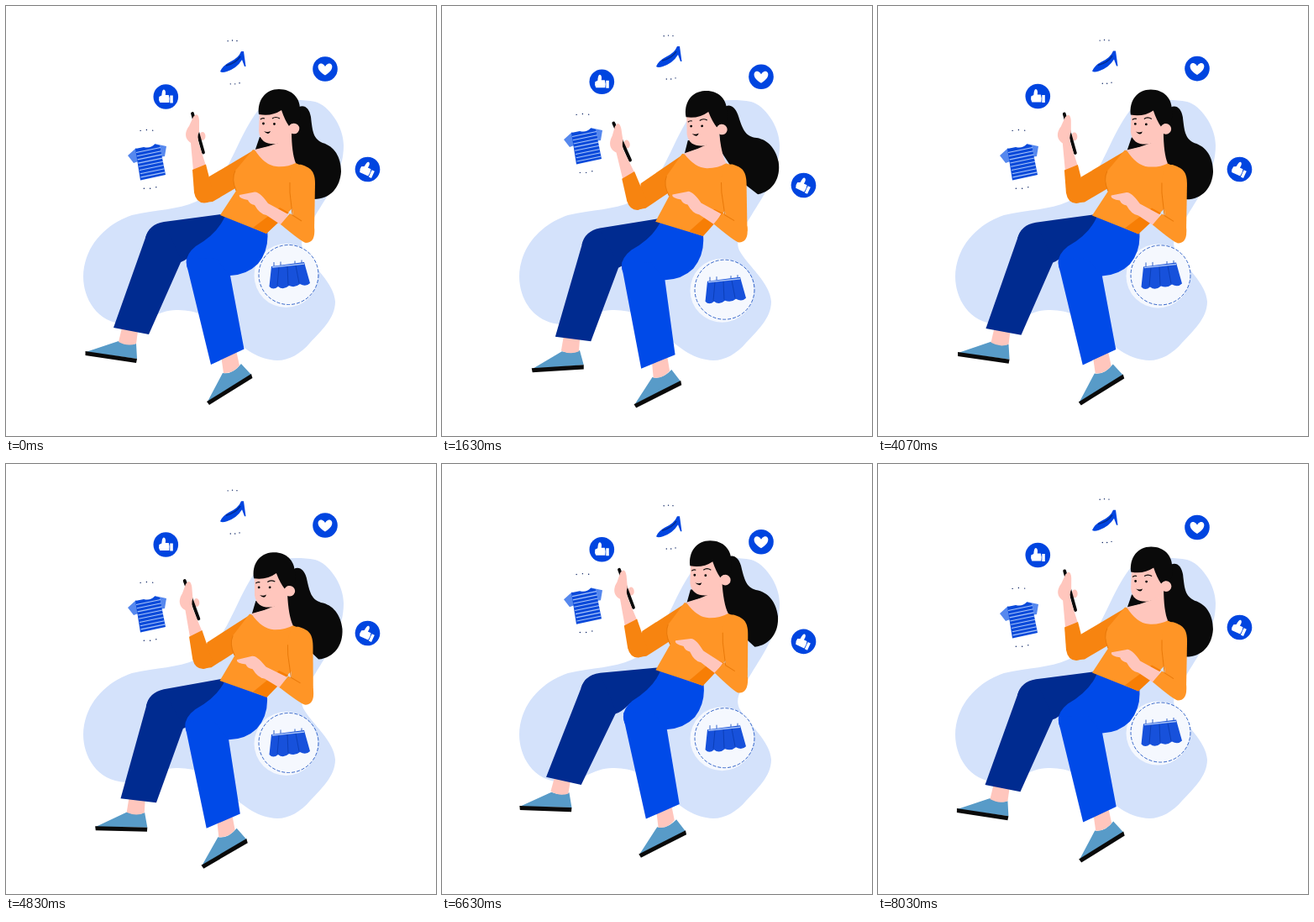
An HTML page that plays this animation: 512x512 px, repeating every 8070 ms.

```html
<!DOCTYPE html>
<html lang="en">
<head>
<meta charset="utf-8">
<title>Floating shopper</title>
<style>
html, body { margin: 0; height: 100%; overflow: hidden; background: #fff; }
svg { display: block; width: 100vw; height: 100vh; }
.skin { fill: #ffc6bd; }
.top { fill: #ff9526; }
.sleeve { fill: #f78410; }
.navy { fill: #002b90; }
.blue { fill: #004ae8; }
.badge { fill: #0045e0; }
.shoe { fill: #589bc8; }
.hair { fill: #0a0a0a; }
.white { fill: #fff; }
.line { fill: none; stroke: #e8790a; stroke-width: 1; }
</style>
</head>
<body>
<svg viewBox="0 0 512 512">
  <defs>
    <g id="like">
      <circle class="badge" r="14.8"/>
      <path class="white" d="M-8 0L-5 -1.500Q-4.500 -8.500 -2.500 -8.500Q.5 -8 -.5 -2L3.500 -2Q5 2 4 7L-7 7Q-9 4 -8 0ZM5 -1.500H8.500V7.500H5Z"/>
    </g>
  </defs>

  <path fill="#d4e2fb" d="M302 122C318 112 345 110 368 114C384 118 402 143 402 166C402 198 384 224 368 250C358 266 348 277 354 291C364 309 391 330 392 352C392 372 375 387 362 401C351 414 337 422 323 422C300 421 284 408 268 394C246 372 233 363 205 362C180 361 166 379 142 379C108 377 92 348 92 322C93 286 118 260 150 249C180 242 204 243 226 233C264 215 274 155 302 122Z"/>

  <g data-float="-7.4 7.4">
    <circle fill="#f5f8fe" cx="333.500" cy="321" r="38"/>
    <circle cx="336.500" cy="320" r="35.500" fill="none" stroke="#3465c9" stroke-width="1" stroke-dasharray="4 2"/>
    <path fill="#1751db" d="M316 310L355 305L362 330Q357 335 350 331Q344 336 337 333Q330 339 324 334Q318 339 313.500 334Z"/>
    <path fill="none" stroke="#0b3fb8" d="M325 311L323 333M335 310L336 332M345 309L349 330"/>
    <path fill="none" stroke="#a9c3f5" stroke-width="1.500" d="M317 311L355 307"/>
    <path fill="none" stroke="#3465c9" d="M319 310V305M327 309V304.500M344 307V303.500M352 306V302.500"/>
  </g>

  <g id="body">
    <g data-spin="2.5 -.9 282 260"><g data-spin="3.16 -1.5 350 122">
      <path class="hair" d="M344 124C352 115 361 119 363 132C365 150 366 158 377 163C391 167 399 180 399 197C398 216 386 230 367 230L350 210L334 170L338 140Z"/>
    </g></g>

    <g data-spin="0 -3 258 262">
      <path class="navy" d="M264 247L188 257Q170 260 166 276L208 305Q215 303 225 292L272 272Z"/>
      <g data-spin=".68 -.8 188 276">
        <g data-spin="4.86 .4 147 394">
          <path class="shoe" d="M95 412L134 399Q146 405 155 402L156 420Z"/>
          <path class="hair" d="M94.500 411L156 420L155 425L94.500 416Z"/>
        </g>
        <path class="skin" d="M138 383L134 400Q145 406 155 402L157 387Z"/>
        <path class="navy" d="M166 276Q170 262 188 258L209 303L170 391L128 383Z"/>
      </g>
    </g>

    <g data-spin="0 1.7 285 258">
      <path class="blue" d="M262 247L311 266Q314 290 300 307Q287 320 267 321Q240 342 216 312Q211 298 226 286Q254 270 262 247Z"/>
      <g data-spin="-1.25 -.6 241 310">
        <g data-spin="-1.63 -1.5 267 430">
          <path class="shoe" d="M240 471L258 437Q270 439 280 426L292 439Z"/>
          <path class="hair" d="M239 471L292 438L293.500 443L242 475Z"/>
        </g>
        <path class="skin" d="M256 416L259 437Q270 438 278 428L274 410Z"/>
        <path class="blue" d="M215 301Q214 306 217 316L244 427L283.500 408.500L267 321L250 300Z"/>
      </g>
    </g>

    <g data-spin="2.5 -.9 282 260">
      <g data-spin="-.78 -.1 288 188">
        <path class="sleeve" d="M296 171L242 203L236 234L246 233L280 213Z"/>
        <g data-spin="2.33 -.98 236 220">
          <ellipse class="skin" cx="234" cy="155" rx="3.500" ry="5"/>
          <path d="M222 128L235 174.500" stroke="#0a0a0a" stroke-width="3.800" stroke-linecap="round"/>
          <path class="skin" d="M223 196L220 163C211 157 214 148 218 143L223 132Q229 125 230 136L230 150Q227 155 230 165L238 190Z"/>
          <path class="sleeve" d="M222 195L238 188.500L247 224Q246 234 236 234.500Q226 234 224 222Z"/>
        </g>
      </g>

      <path class="top" d="M294 171L322 184L345 187L360 194L346 236L310 271L255 249L274 220Q268 206 273 196Z"/>
      <path fill="#f77e05" d="M294 264L310 271L337 246L326 240Z"/>
      <path class="line" d="M274 220Q268 206 273 196"/>

      <path class="hair" d="M302 156L296.500 172Q310 167 328 165L318 156Z"/>
      <path class="skin" d="M296 171Q312 168 327 162L340 148Q340 175 345 187Q335 192 322 191Q308 190 296 171Z"/>

      <g data-spin="-1.44 -1.13 325 165">
        <path class="skin" d="M302 122L301 149C302 162 312 165 322 164C334 162 340 152 343 140L338 115Z"/>
        <path class="hair" d="M301 129C299 112 309 99 325 99C341 99 350 110 350 122C352 132 349 140 345 140Q340 139 337 143Q332 136 328 124Q316 132 301 129Z"/>
        <circle class="skin" cx="343" cy="146" r="6.300"/>
        <circle cx="306.500" cy="140" r="1.400"/>
        <circle cx="319.500" cy="140.500" r="1.400"/>
        <path fill="none" stroke="#0a0a0a" stroke-width="1.200" d="M303 135Q305 133 308 134M317 134Q321 131 326 134"/>
        <path d="M307 149Q311 151 315 149Q313 155 307 149Z"/>
      </g>

      <g data-spin="-1.7 0 350 195">
        <g data-spin="-1.77 -2.2 357 268">
          <path class="skin" d="M336 248L312 235C307 228 301 221 296 221.500L278 225Q276 229 288 231Q290 236 296 237Q302 248 310 249L328 261Z"/>
          <path class="top" d="M338 247L367 263Q369 282 357 282Q352 281 327 260Z"/>
        </g>
        <path class="top" d="M338 216C337 196 344 187 352 189C364 193 368 198 368 212L367 269L342 251Z"/>
        <path class="line" d="M338 210V222L341 249L352 256"/>
      </g>
    </g>
  </g>

  <g data-float="7.4 -7.4"><use href="#like" x="190.300" y="108"/></g>
  <g data-float="-10.4 0"><use href="#like" transform="translate(430.500 194.500) rotate(25)"/></g>
  <g data-float="-7.4 -7.4">
    <circle class="badge" cx="380" cy="75" r="14.800"/>
    <path class="white" transform="translate(380 75.500)" d="M0 7C-12 0 -9 -8 -4 -7Q-1 -6 0 -3.500Q1 -6 4 -7C9 -8 12 0 0 7Z"/>
  </g>

  <g data-float="10.4 0">
    <path fill="#5688ee" d="M145 178L155 169L160 184L152 187ZM177 164L191 167L189 179L182 180Z"/>
    <path fill="#0b4ada" d="M154 170L164 168Q172 170 177 164.500L183 166L190 201L160 207.500Z"/>
    <g id="stripes" stroke="#a9c5fa" stroke-width="1.100"></g>
    <g data-dots="168 182.5 35"></g>
  </g>

  <g data-float="0 -10.4">
    <path class="badge" d="M255 78Q258 71 266 67Q277 62 280 54L283 54L285.500 72L284 72L281 64Q275 74 263 78Q257 80 255 78Z"/>
    <path fill="none" stroke="#002b90" stroke-width="1.500" d="M262 71Q274 68 279 60"/>
    <g data-dots="270 67 26"></g>
  </g>
</svg>
<script>
const PERIOD = 4035;
const all = key => [...document.querySelectorAll(`[data-${key}]`)];
const nums = text => text.split(' ').map(Number);

let lines = '';
for (let i = 0; i < 8; i++) {
  const x = 155 + i * 0.8, y = 174.5 + i * 4.2;
  lines += `<path d="M${x} ${y}L${x + 29} ${y - 6}"/>`;
}
document.getElementById('stripes').innerHTML = lines;

// Only specks of these rings show, near top and bottom
for (const g of all('dots')) {
  const [cx, cy, r] = nums(g.dataset.dots);
  g.innerHTML = [-103, -91, -79, 72, 84, 96].map(deg => {
    const a = deg * Math.PI / 180;
    return `<circle cx="${cx + r * Math.cos(a)}" cy="${cy + r * Math.sin(a)}" r=".7" fill="#001a5c"/>`;
  }).join('');
}

const floats = all('float').map(el => [el, ...nums(el.dataset.float)]);
const spins = all('spin').map(el => [el, ...nums(el.dataset.spin)]);
const body = document.getElementById('body');

function draw(now) {
  const phase = 2 * Math.PI * (now % PERIOD) / PERIOD;
  const sin = Math.sin(phase), swing = Math.cos(phase) - 1;
  body.setAttribute('transform', `translate(0 ${8 * sin - 0.5 * swing})`);
  for (const [el, a, b] of floats)
    el.setAttribute('transform', `translate(0 ${a * swing + b * sin})`);
  for (const [el, a, b, x, y] of spins)
    el.setAttribute('transform', `rotate(${a * swing + b * sin} ${x} ${y})`);
}

const start = performance.now();
function tick() {
  draw(performance.now() - start);
  requestAnimationFrame(tick);
}
tick();
</script>
</body>
</html>
```
